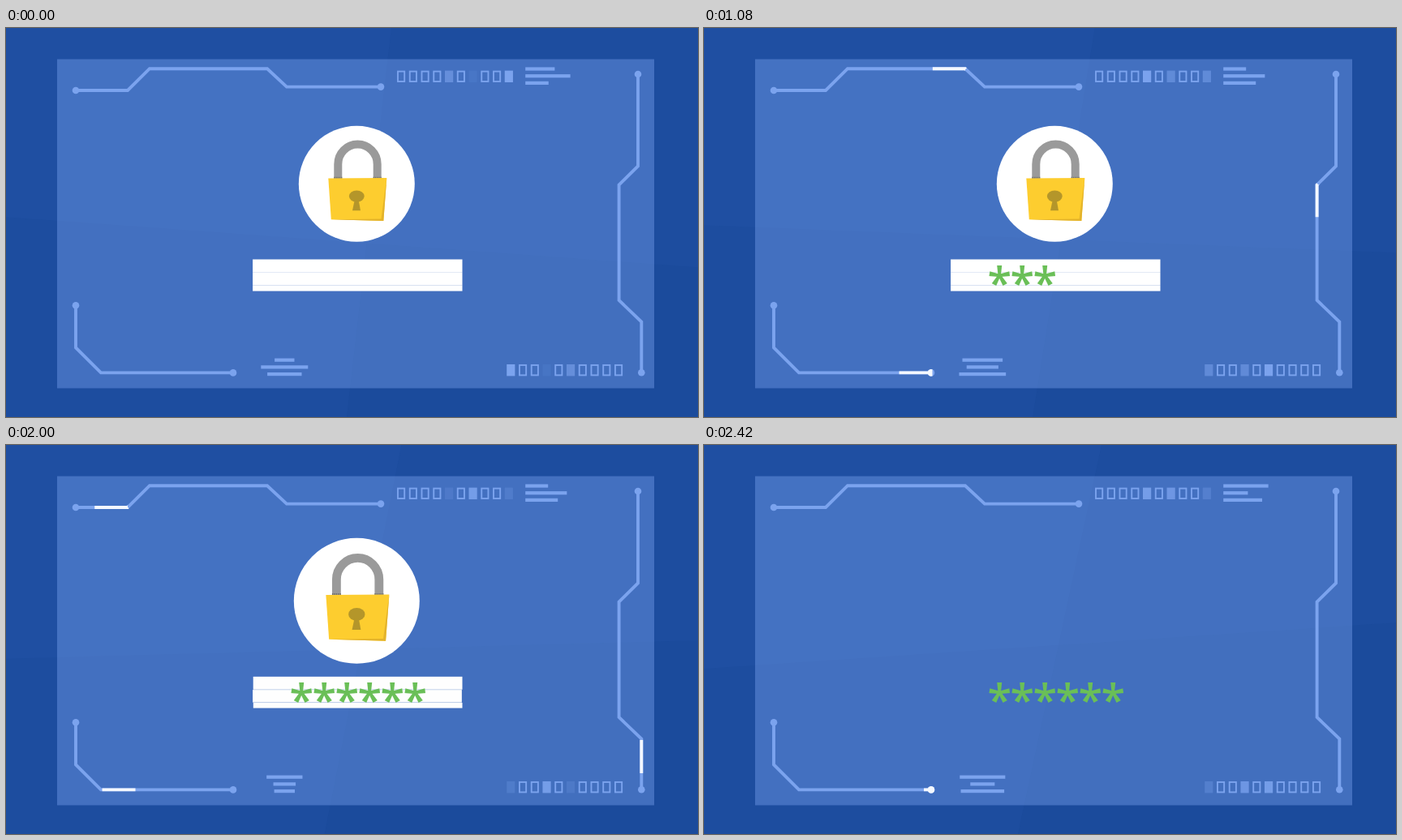
Animation of 853x480 px, one loop 2510 ms. Source, as an HTML page:

```html
<!DOCTYPE html>
<html lang="en">
<head>
<meta charset="utf-8">
<title>Password lock</title>
<style>
  html, body { margin: 0; width: 100%; height: 100%; overflow: hidden; background: #1f4fa2; }
  svg { display: block; width: 100%; height: 100%; }
  text { font: 600 54px "Open Sans", "Noto Sans", sans-serif; fill: #6abf57; text-anchor: middle; }
</style>
</head>
<body>
<svg id="stage" viewBox="0 0 853 480">
  <rect width="853" height="480" fill="#1f4fa2"/>
  <polygon id="shadeRight" fill="#123a80" opacity=".1"/>
  <polygon id="shadeLow" fill="#123a80" opacity=".1"/>
  <rect x="63" y="38.5" width="736" height="406" fill="#7ba3ee" opacity=".41"/>
  <g id="wires"></g>
  <g id="cells"></g>
  <g id="bars" fill="#7ba3ee"></g>
  <g id="lock">
    <circle cx="432.3" cy="192.3" r="71.5" fill="#fff"/>
    <path d="M409.3 186V168a24.2 24.5 0 0 1 48.4 0V186" fill="none" stroke="#9a9a9a" stroke-width="10"/>
    <path d="M404.3 184.7h10M452.7 184.7h10" stroke="#6b6b6b" stroke-width="2" stroke-dasharray="1.2 1"/>
    <polygon points="397.3,185.5 469.3,185 465.3,238 400.8,236.2" fill="#fdcd2f"/>
    <polygon points="469.3,185 465.3,238 400.8,236.2 462.5,235.5" fill="#e3b32b"/>
    <ellipse cx="432.3" cy="207.6" rx="9.4" ry="7.2" fill="#b4962a"/>
    <polygon points="429.8,212 434.6,212 437,225.3 427,225.3" fill="#b4962a"/>
  </g>
  <g id="field" fill="#fff"></g>
  <g id="stars"></g>
</svg>
<script>
const LOOP = 2510, STEPS = 30, BLUE = '#7ba3ee';
const $ = id => document.getElementById(id);

function add(parent, tag, attrs) {
  const el = document.createElementNS('http://www.w3.org/2000/svg', tag);
  set(el, attrs);
  parent.appendChild(el);
  return el;
}
function set(el, attrs) {
  for (const name in attrs) el.setAttribute(name, attrs[name]);
}
// 1 at the crest, -1 half a period later.
const wave = (k, period, crest) => Math.cos(2 * Math.PI * (k - crest) / period);

// Circuit lines, listed in the direction in which the light travels.
const EXTRA = 8, PULSE = 41;
function extend([x, y], [fromX, fromY]) {
  const d = EXTRA / Math.hypot(x - fromX, y - fromY);
  return [x + (x - fromX) * d, y + (y - fromY) * d];
}
function wire(id, points) {
  const [first, second] = points, [last, previous] = points.slice().reverse();
  const route = [extend(first, second), ...points.slice(1, -1), extend(last, previous)];
  const mask = add($('wires'), 'mask', {
    id, maskUnits: 'userSpaceOnUse', x: 0, y: 0, width: 853, height: 480
  });
  const light = add(mask, 'polyline', {
    points: route.join(' '), fill: 'none', stroke: '#fff', 'stroke-width': 13
  });
  for (const color of [BLUE, '#f4f8ff']) {
    const g = add($('wires'), 'g', color === BLUE ? {} : { mask: `url(#${id})` });
    add(g, 'polyline', { points: points.join(' '), fill: 'none', stroke: color, 'stroke-width': 3.9 });
    for (const [cx, cy] of [first, last]) add(g, 'circle', { cx, cy, r: 4.3, fill: color });
  }
  return tail => {
    const from = tail + EXTRA, start = Math.max(0, from);
    const length = Math.max(0, from + PULSE - start);
    set(light, { 'stroke-dasharray': `0 ${start} ${length} 2000` });
  };
}
const topWire = wire('lightTop', [[462, 72.6], [346, 72.6], [322, 50.2], [177, 50.2], [150, 77], [86, 77]]);
const sideWire = wire('lightSide', [[779, 57], [779, 170.5], [755.6, 193.5], [755.6, 336], [783.3, 362.5], [783.3, 425.3]]);
const lowWire = wire('lightLow', [[86, 342.3], [86, 394.5], [117, 425.4], [280, 425.4]]);

// Rows of ten cells; the filled ones blink.
function cellRow(x0, y, filled) {
  const blink = [];
  for (let i = 0; i < 10; i++) {
    const x = x0 + i * 14.75, slot = filled.indexOf(i);
    if (slot < 0) {
      add($('cells'), 'rect', { x: x + 1, y: y + 1, width: 8.2, height: 12.4, fill: 'none', stroke: BLUE, 'stroke-width': 1.9 });
    } else {
      blink[slot] = add($('cells'), 'rect', { x, y, width: 10.2, height: 14.4, fill: BLUE });
    }
  }
  return blink;
}
const cellRows = [cellRow(482, 52.6, [4, 6, 9]), cellRow(617.2, 415, [5, 3, 0])];
const SLOW = 17.5, FAST = 11;
const cellCrests = [13.5, 8.5, 0], topCrests = [7.5, 0.5, 5], lowCrests = [10.2, 0, 13.5];

const barStack = y0 => [0, 1, 2].map(i => add($('bars'), 'rect', { y: y0 + i * 8.7, height: 4.2 }));
const topBars = barStack(48.4), lowBars = barStack(407.6);

const strips = [0, 1, 2].map(() => add($('field'), 'rect', {}));
const stars = Array.from({ length: 6 }, (_, i) => {
  const star = add($('stars'), 'text', { x: 364.3 + i * 28, y: 334 });
  star.textContent = '*';
  return star;
});

function drawShades(k) {
  const p = k / (STEPS - 1);
  const tilt = 62 - 119 * p ** 1.8;
  const left = 255.5 - tilt * .36;
  set($('shadeLow'), { points: `0,${left} 853,${left + tilt} 853,480 0,480` });
  set($('shadeRight'), { points: `${475 + 15 * p},0 853,0 853,480 ${420 - 33 * p},480` });
}

function drawWires(k) {
  const mid = k - 13, run = 148 + 15.3 * mid + .0115 * mid ** 3;
  topWire(run);
  sideWire(run - 3);
  // The low light runs twice per loop and doubles its pace on the way.
  const lap = k % (STEPS / 2);
  lowWire(Math.max(15.5 * lap - 46, 30.5 * lap - 177));
}

function drawMeters(k) {
  for (const row of cellRows) {
    row.forEach((cell, i) => set(cell, { opacity: .55 + .45 * wave(k, SLOW, cellCrests[i]) }));
  }
  topBars.forEach((bar, i) => set(bar, { x: 640.2, width: 42 + 14 * wave(k, FAST, topCrests[i]) }));
  lowBars.forEach((bar, i) => {
    const width = 40 + 18 * wave(k, SLOW, lowCrests[i]);
    set(bar, { x: 343.3 - width / 2, width });
  });
}

// Swells a little, then shrinks away.
function drawLock(k) {
  const t = Math.min(1, Math.max(0, (k - 21) / 6.95));
  const scale = Math.max(0, 1 - (2.55 * t ** 3 - 1.55 * t ** 2));
  set($('lock'), { transform: `translate(432.3 192.3) scale(${scale}) translate(-432.3 -192.3)` });
}

// The field splits into three strips that slide shut from either side.
function drawField(k) {
  const e = Math.max(0, (k - 23) / 6) ** 3.3;
  const gap = e ? .3 : 0;
  const edges = [285.5, 301.8, 317.7, 324.6];
  strips.forEach((strip, i) => {
    const cut = 258.4 * Math.min(1, e * (.84 + .08 * i));
    const y = edges[i] + gap + (i === 1 ? 0 : 15 * e);
    const end = edges[i + 1] - (i === 2 ? 0 : 10 * e);
    set(strip, {
      x: 304.1 + (i === 1 ? 0 : cut), y,
      width: 258.4 - cut, height: Math.max(0, end - y)
    });
  });
  set($('field'), { opacity: 1 - e });
}

function draw(k) {
  drawShades(k);
  drawWires(k);
  drawMeters(k);
  drawLock(k);
  drawField(k);
  stars.forEach((star, i) => set(star, { visibility: i < Math.floor(k / 4) ? 'visible' : 'hidden' }));
}

// Twelve steps a second, each starting on a whole hundredth.
function tick() {
  const ticks = Math.floor(performance.now() % LOOP / 10);
  draw(Math.min(STEPS - 1, Math.floor((ticks + .5) * .12)));
  requestAnimationFrame(tick);
}
draw(0);
requestAnimationFrame(tick);
</script>
</body>
</html>
```
